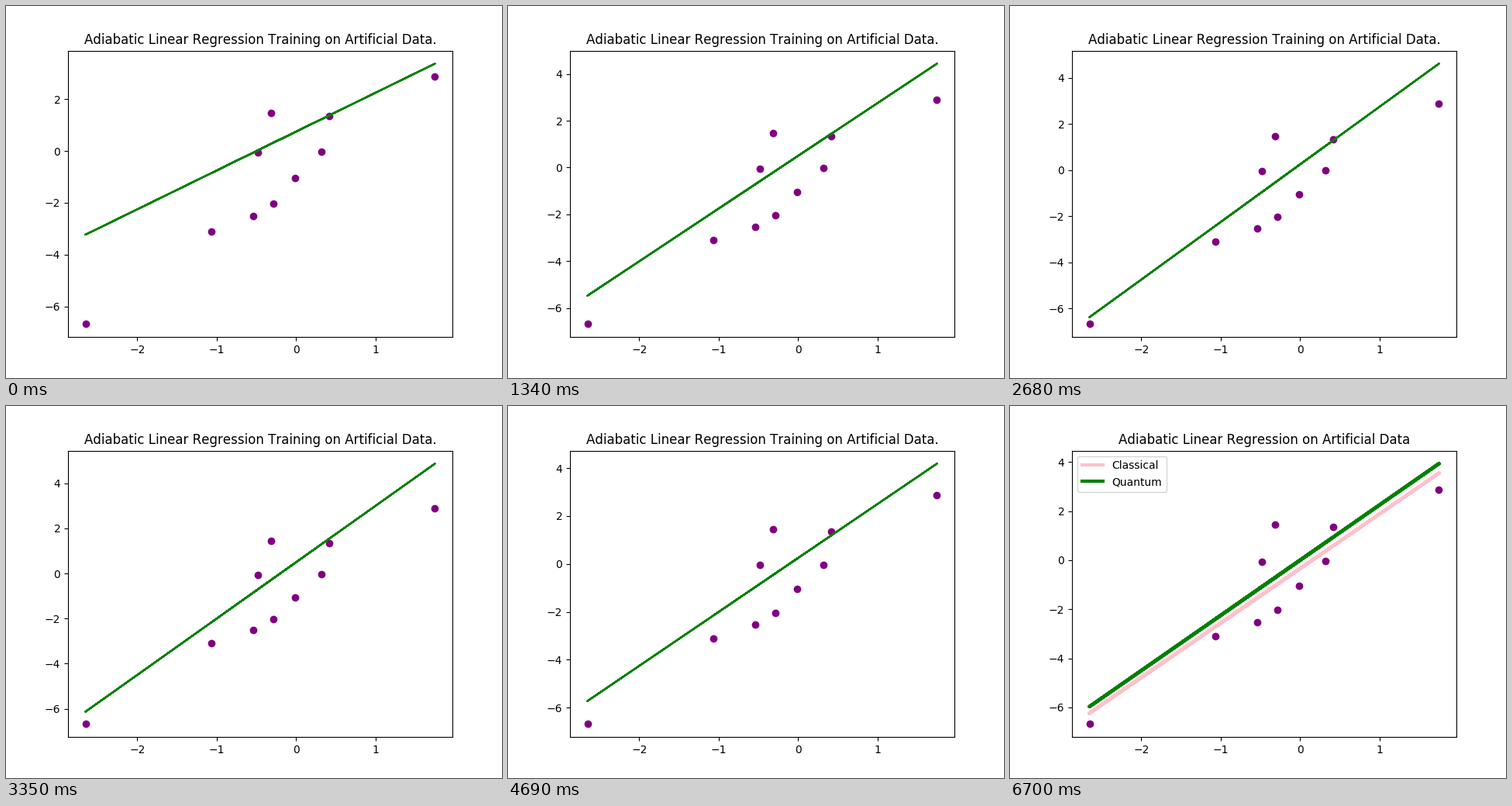
These frames come from a looping animation (640x480 px, 7.37 s). A matplotlib script:

```python
import numpy as np
import matplotlib.pyplot as plt
from matplotlib.animation import FuncAnimation

STEP_MS = 670
PASSES = 4  # overlapping strokes give the fitted line its firm edge

plt.rcParams["text.kerning_factor"] = 6

# Random samples around a straight line
X = np.random.RandomState(11).randn(10)
Y = np.array([2.885, -2.033, -0.054, -6.682, -1.05,
              1.46, -2.52, -0.022, 1.345, -3.103])

# (slope, intercept) on a quarter grid: approach, oscillate, settle
STEPS = ([(1.5, 0.75), (1.25, 0.75), (2.25, 0.5)]
         + 2 * [(2.5, 0.5), (2.5, 0.25)]
         + 2 * [(2.25, 0.25)] + [(2.25, 0.5)])
QUANTUM = (2.25, 0)
CLASSICAL = np.polyfit(X, Y, 1)

fig, ax = plt.subplots(figsize=(6.4, 4.8), dpi=100)


def draw_fit(weights, color, **style):
    xs = np.tile(X, PASSES)
    ax.plot(xs, np.polyval(weights, xs), color=color, **style)


def draw(i):
    ax.clear()
    ax.scatter(X, Y, color="purple")
    if i < len(STEPS):
        draw_fit(STEPS[i], "green")
        ax.set_title("Adiabatic Linear Regression Training on Artificial Data.")
    else:
        draw_fit(CLASSICAL, "pink", linewidth=3, label="Classical")
        draw_fit(QUANTUM, "green", linewidth=3, label="Quantum")
        ax.legend(loc="upper left")
        ax.set_title("Adiabatic Linear Regression on Artificial Data")
    return ax.get_children()


anim = FuncAnimation(fig, draw, frames=len(STEPS) + 1, interval=STEP_MS,
                     init_func=lambda: draw(0), repeat=True, repeat_delay=0)
plt.show()
```
